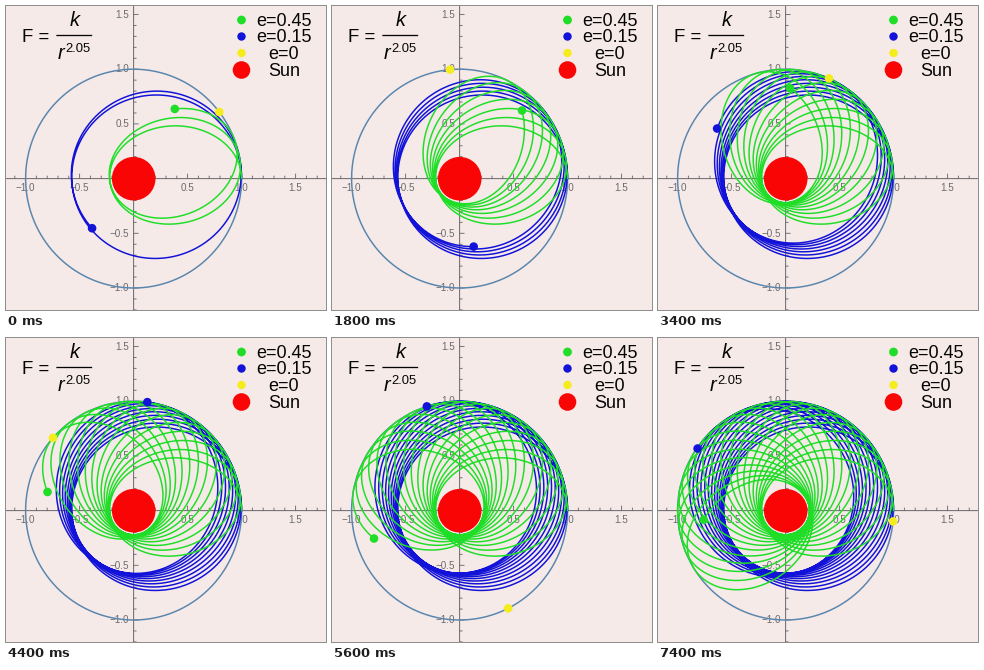
A matplotlib script for the animation above (7600 ms loop, 320x304 px).

```python
import numpy as np
import matplotlib.pyplot as plt
from matplotlib.animation import FuncAnimation
from matplotlib.patches import Circle

W, H, DPI = 320, 304, 80
PT = 72 / DPI                      # one pixel in points
CX, CY, SX, SY = 127.6, 172.6, 108.0, 109.4

FRAMES, INTERVAL = 38, 200
PER_TURN = 1200                    # integration steps per circular period
FIRST, STEP = 1325, 288            # steps drawn at the start, added per frame
POWER = 2.05

BG, INK, AXIS = "#f6eae8", "#050505", "#6a6a6c"
GREEN, BLUE, YELLOW, RED = "#20de28", "#1212d8", "#f5ec1e", "#fa0505"
STEEL = "#5a86ae"

plt.rcParams["font.family"] = "Liberation Sans"


def accel(z):
    return -z / abs(z) ** (POWER + 1)


def orbit(e, steps):
    """Path under a 1/r^POWER pull, launched from aphelion at r = 1 (RK4)."""
    h = 2 * np.pi / PER_TURN
    z, v = 1 + 0j, 1j * np.sqrt((1 - e) / (1 + e))
    path = [z]
    for _ in range(steps):
        a1 = accel(z)
        v2 = v + a1 * h / 2
        a2 = accel(z + v * h / 2)
        v3 = v + a2 * h / 2
        a3 = accel(z + v2 * h / 2)
        v4 = v + a3 * h
        a4 = accel(z + v3 * h)
        z += h / 6 * (v + 2 * v2 + 2 * v3 + v4)
        v += h / 6 * (a1 + 2 * a2 + 2 * a3 + a4)
        path.append(z)
    path = np.array(path)
    return CX + SX * path.real, CY - SY * path.imag


fig = plt.figure(figsize=(W / DPI, H / DPI), dpi=DPI, facecolor=BG)
ax = fig.add_axes([0, 0, 1, 1])
ax.set_xlim(0, W)
ax.set_ylim(H, 0)
ax.axis("off")


def line(xs, ys, color, width, z):
    return ax.plot(xs, ys, color=color, lw=width * PT, zorder=z,
                   snap=False)[0]


def disc(x, y, r, color, z=6):
    return ax.add_patch(Circle((x, y), r, fc=color, ec="none", zorder=z))


def label(x, y, s, size, color=INK, ha="center", va="baseline", **kw):
    ax.text(x, y, s, fontsize=size * PT, color=color, ha=ha, va=va, **kw)


def draw_axes():
    line([0, W], [CY, CY], AXIS, 1, 1)
    line([CX, CX], [0, H], AXIS, 1, 1)
    for i in range(-12, 18):
        if i == 0:
            continue
        size = 4.5 if i % 5 == 0 else 2.5
        x, y = CX + SX * i / 10, CY - SY * i / 10
        line([x, x], [CY, CY - size], AXIS, 0.9, 1)
        line([CX, CX + size], [y, y], AXIS, 0.9, 1)
        if i % 5 == 0:
            name = f"{i / 10:.1f}".replace("-", "\u2212")
            label(x - 0.3, 185.2, name, 9.9, AXIS, zorder=1)
            label(123.5, y - 0.7, name, 9.9, AXIS, ha="right",
                  va="center_baseline", zorder=1)


def draw_formula():
    label(15.5, 35.5, "F =", 18.6, ha="left")
    label(69, 20.5, "k", 20, style="italic")
    line([51, 85.5], [29.5, 29.5], INK, 1.3, 7)
    label(51.5, 53, "r", 20, ha="left", style="italic")
    label(59, 46, "2.05", 13, ha="left")


def draw_legend():
    rows = [(14, 4.4, GREEN, "e=0.45"), (30.5, 4.2, BLUE, "e=0.15"),
            (47, 4.2, YELLOW, "e=0"), (64, 8.8, RED, "Sun")]
    for y, r, color, name in rows:
        disc(235.5, y, r, color)
        label(277.8, y + 5.8, name, 18)


draw_axes()
draw_formula()
draw_legend()
disc(127.7, 172.7, 21.8, RED, 5)

total = FIRST + STEP * (FRAMES - 1)
bodies = []
for z, (e, trail, dot, keep) in enumerate([(0, STEEL, YELLOW, PER_TURN),
                                           (0.15, BLUE, BLUE, total),
                                           (0.45, GREEN, GREEN, total)]):
    xs, ys = orbit(e, total)
    bodies.append((xs, ys, keep, line([], [], trail, 1.5, 2 + z),
                   disc(0, 0, 4.3, dot, 8 - z)))


def update(i):
    n = FIRST + STEP * i
    artists = []
    for xs, ys, keep, trail, dot in bodies:
        shown = slice(max(0, n - keep), n + 1, 3)
        trail.set_data(xs[shown], ys[shown])
        dot.center = xs[n], ys[n]
        artists += [trail, dot]
    return artists


anim = FuncAnimation(fig, update, frames=FRAMES, interval=INTERVAL,
                     repeat=True, repeat_delay=0)
plt.show()
```
